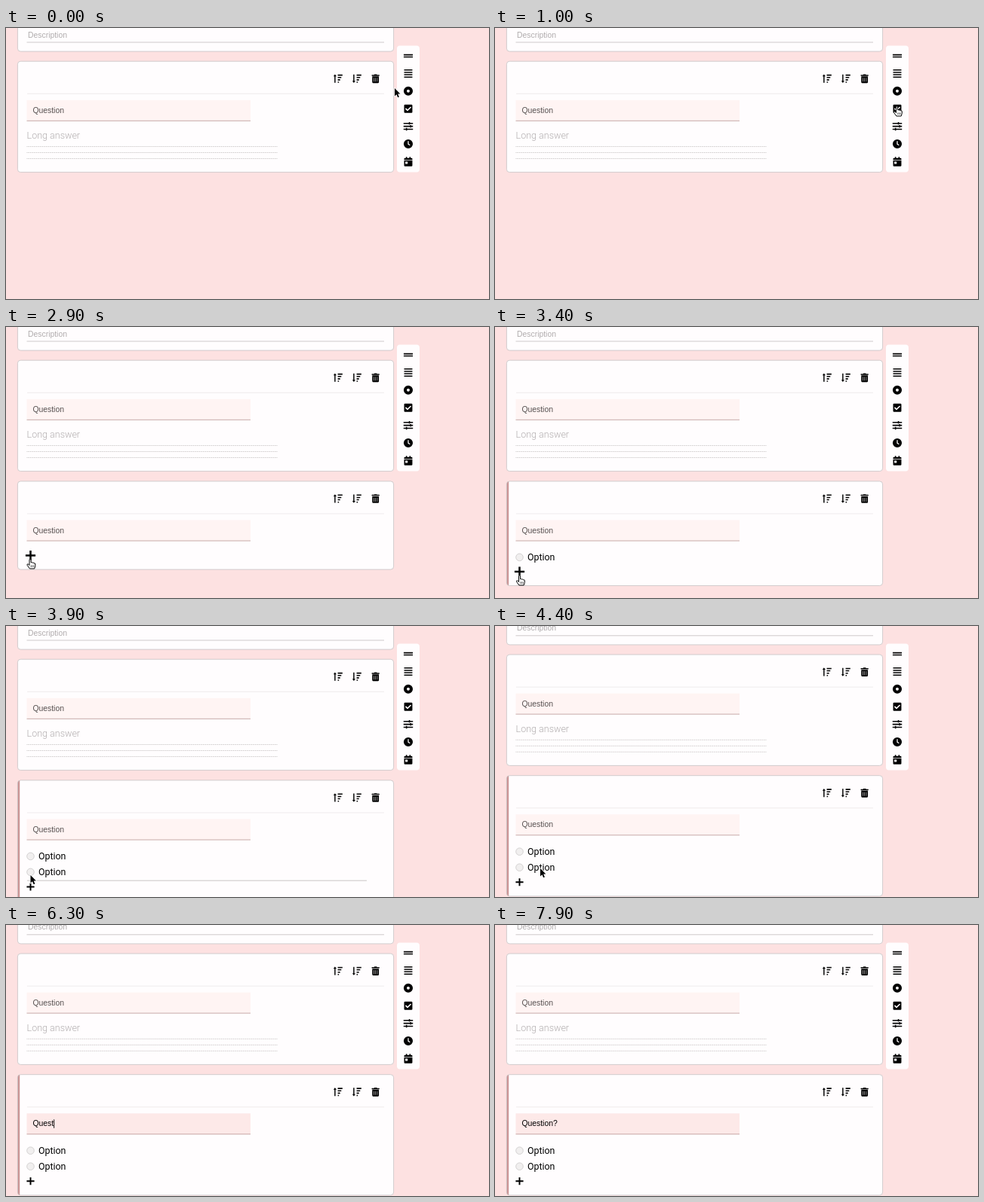
Animation of 640x360 px, one loop 8 s. Source, as an HTML page with a canvas:

```html
<!DOCTYPE html>
<html lang="en">
<head>
<meta charset="utf-8">
<title>Form builder</title>
<style>
  html, body { margin: 0; width: 100%; height: 100%; overflow: hidden; background: #fde1e1; }
  canvas { display: block; width: 640px; height: 360px; }
</style>
</head>
<body>
<canvas id="stage"></canvas>
<script>
const LOOP = 8000, STEP = 100;
const canvas = document.getElementById('stage');
const ctx = canvas.getContext('2d');
const dpr = window.devicePixelRatio || 1;
canvas.width = 640 * dpr;
canvas.height = 360 * dpr;

const INPUT_FONT = '10.4px "Liberation Sans", Arial, sans-serif';
const HINT_FONT = '300 12.5px Roboto, sans-serif';
const OPTION_FONT = '400 12.4px Roboto, sans-serif';
const PAPER = '#fffdfe', BACKDROP = '#fde1e1', FIELD = '#fff4f3';

// Icons live in a box 512 units high.
const rect = (x, y, w, h) => `M${x} ${y}h${w}v${h}h${-w}z`;
const disc = (x, y, r) => `M${x - r} ${y}a${r} ${r} 0 1 0 ${2 * r} 0a${r} ${r} 0 1 0 ${-2 * r} 0z`;
const slider = (y, x) =>
  `M0 ${y}h${x}v-36h64v36h${448 - x}v64H${x + 64}v36h-64v-36H0z`;
const sortBars = [0, 1, 2, 3].map(i => rect(240, 32 + i * 128, 256 - i * 64, 64)).join('');
const icon = (width, path) => ({ width, path: new Path2D(path) });

const ICONS = {
  up: icon(512, sortBars + 'M88 20L4 130h54v350h60V130h54z'),
  down: icon(512, sortBars + 'M88 492L4 382h54V32h60v350h54z'),
  trash: icon(448,
    'M32 128h384v336a48 48 0 0 1-48 48H80a48 48 0 0 1-48-48z' +
    'M432 32H312l-9-19A24 24 0 0 0 281 0H167a24 24 0 0 0-22 13l-9 19H16A16 16 0 0 0 0 48v32' +
    'a16 16 0 0 0 16 16h416a16 16 0 0 0 16-16V48a16 16 0 0 0-16-16z' +
    [116, 212, 308].map(x => rect(x, 208, 24, 224)).join('')),
  plus: icon(448, 'M184 48h80v168h168v80H264v168h-80V296H16v-80h168z'),
  grip: icon(512, rect(8, 168, 496, 64) + rect(8, 288, 496, 64)),
  lines: icon(448, [36, 164, 292, 420].map(y => rect(0, y, 448, 64)).join('')),
  radio: icon(512, disc(256, 256, 248) + disc(256, 256, 80)),
  check: icon(448,
    'M48 32h352a48 48 0 0 1 48 48v352a48 48 0 0 1-48 48H48a48 48 0 0 1-48-48V80a48 48 0 0 1 48-48z' +
    'M184 396L56 268l46-46 82 82 162-162 46 46z'),
  sliders: icon(512, slider(64, 288) + slider(224, 352) + slider(384, 128)),
  clock: icon(512, disc(256, 256, 248) + 'M230 104h52v146l82 60-30 41-104-77z'),
  calendar: icon(448,
    'M0 160v-48a48 48 0 0 1 48-48h48V0h64v64h128V0h64v64h48a48 48 0 0 1 48 48v48z' +
    'M0 192h448v272a48 48 0 0 1-48 48H48a48 48 0 0 1-48-48z' + rect(64, 256, 128, 128))
};

const TOOLS = ['grip', 'lines', 'radio', 'check', 'sliders', 'clock', 'calendar'];

const clamp = v => Math.max(0, Math.min(1, v));
const ramp = (t, start, length) => clamp((t - start) / length);
const hover = (t, from, to) => ramp(t, from, 150) * (1 - ramp(t, to, 250));

function drawIcon(name, x, y, scale = 1) {
  const { width, path } = ICONS[name], s = 12.48 / 512 * scale;
  ctx.save();
  ctx.translate(x, y);
  ctx.scale(s, s);
  ctx.translate(-width / 2, -256);
  ctx.fillStyle = '#000';
  ctx.fill(path, 'evenodd');
  ctx.restore();
}

function text(string, x, y, font, color) {
  ctx.font = font;
  ctx.fillStyle = color;
  ctx.fillText(string, x, y);
}

function rule(x1, x2, y, color, dash = []) {
  ctx.beginPath();
  ctx.setLineDash(dash);
  ctx.moveTo(x1, y);
  ctx.lineTo(x2, y);
  ctx.strokeStyle = color;
  ctx.lineWidth = 0.8;
  ctx.stroke();
  ctx.setLineDash([]);
}

function panel(y, height, active) {
  ctx.beginPath();
  ctx.roundRect(15.4, y + 0.4, 498.2, height - 0.8, 4);
  ctx.fillStyle = PAPER;
  ctx.fill();
  if (active) {
    ctx.save();
    ctx.clip();
    ctx.fillStyle = '#cc9596';
    ctx.fillRect(15, y, 3.2, height);
    ctx.restore();
  }
  ctx.strokeStyle = '#c6c3c4';
  ctx.lineWidth = 0.8;
  ctx.stroke();
}

function questionCard(y, height, { active = false, fill = FIELD, value = '' } = {}) {
  panel(y, height, active);
  drawIcon('up', 440, y + 23.5);
  drawIcon('down', 465, y + 23.5);
  drawIcon('trash', 489.7, y + 23.5, 0.94);
  rule(28, 501, y + 43.5, '#ebe6e7');
  ctx.fillStyle = fill;
  ctx.fillRect(27.5, y + 52, 296.5, 28);
  rule(27.5, 324, y + 79.5, '#b99a99');
  text(value || 'Question', 35.4, y + 69, INPUT_FONT, value ? '#000' : '#585252');
}

function option(y, underlined) {
  ctx.beginPath();
  ctx.arc(32.5, y, 4.8, 0, 7);
  ctx.fillStyle = '#f1efef';
  ctx.fill();
  ctx.strokeStyle = '#cbc8c8';
  ctx.lineWidth = 0.8;
  ctx.stroke();
  text('Option', 43, y + 4.3, OPTION_FONT, '#000');
  if (underlined) rule(28, 478, y + 11.3, '#bcb8b8');
}

// time, x, y, shape
const POINTER = [
  [0, 515, 80, 'arrow'], [100, 514.6, 79.5, 'arrow'], [200, 514.4, 79.2, 'arrow'],
  [500, 514.4, 79.2, 'arrow'], [800, 526, 96, 'hand'], [1000, 532.5, 104, 'hand'],
  [1200, 532.5, 105, 'hand'], [1300, 532.5, 105, 'hand'], [1700, 532, 82, 'hand'],
  [1900, 532, 82, 'hand'], [2000, 490, 108, 'arrow'], [2100, 395.5, 163.5, 'arrow'],
  [2400, 180, 248, 'arrow'], [2700, 45, 303, 'arrow'], [2800, 32, 308, 'hand'],
  [3100, 32, 308, 'hand'], [3300, 32.5, 326, 'hand'], [3400, 32.5, 330, 'hand'],
  [3500, 32.5, 331, 'arrow'], [3900, 32.5, 331, 'arrow'], [4200, 60, 322, 'arrow'],
  [4500, 60, 322, 'arrow'], [4700, 105, 285, 'arrow'], [4800, 122, 274, 'beam'],
  [4900, 128, 270, 'beam'], [5900, 128, 270, 'none'], [LOOP, 128, 270, 'none']
];

const ARROW = new Path2D('M0 0V10.4L2.4 8.2 4.2 12.2 5.9 11.5 4.2 7.5H7.4Z');
const HAND = new Path2D('M-1 1Q0-.8 1 1L1.2 5Q2.4 4 3.1 5.3 4.4 4.6 5 5.8 6.6 5.3 6.8 7' +
  'V9.5L5.7 13H-.6L-3.8 8.6Q-4.6 6.6-2.8 6.9L-1 8.5Z');
const HAND_CREASES = new Path2D('M1.2 8.4V11M3 8.4V11M4.8 8.4V11');
const BEAM = new Path2D('M-2.5-5.5Q0-5.5 0-4V4.5Q0 6-2.5 6M2.5-5.5Q0-5.5 0-4V4.5Q0 6 2.5 6M-1.3 2H1.3');

function drawPointer(t) {
  const next = POINTER.findIndex(key => key[0] > t);
  const [t0, x0, y0, shape] = POINTER[next - 1], [t1, x1, y1] = POINTER[next];
  if (shape === 'none') return;
  const p = (t - t0) / (t1 - t0);
  ctx.save();
  ctx.translate(x0 + (x1 - x0) * p, y0 + (y1 - y0) * p);
  ctx.lineJoin = 'round';
  if (shape === 'arrow') {
    ctx.strokeStyle = '#fff';
    ctx.lineWidth = 1.6;
    ctx.stroke(ARROW);
    ctx.fillStyle = '#000';
    ctx.fill(ARROW);
  } else if (shape === 'hand') {
    ctx.fillStyle = '#fff';
    ctx.fill(HAND);
    ctx.strokeStyle = '#000';
    ctx.lineWidth = 1;
    ctx.stroke(HAND);
    ctx.lineWidth = 0.6;
    ctx.stroke(HAND_CREASES);
  } else {
    ctx.strokeStyle = '#222';
    ctx.lineWidth = 1;
    ctx.stroke(BEAM);
  }
  ctx.restore();
}

function typedValue(t) {
  if (t < 5900) return '';
  const letters = Math.min(8, Math.floor((t - 5900) / 600 * 7) + 1);
  return 'Question'.slice(0, letters) + (t >= 7400 ? '?' : '');
}

function caretShown(t) {
  return [[5100, 5500], [5900, 7000], [7400, 7800]].some(([on, off]) => t >= on && t < off);
}

function newCard(t, scroll) {
  if (t < 1900) return;
  const entry = ramp(t, 1850, 500);
  const y = 204.5 - 12 * (1 - entry) ** 2 - scroll;
  const first = ramp(t, 3000, 200), second = ramp(t, 3400, 200);
  const grown = 21.5 * (first + second);
  const value = typedValue(t);
  const fill = t >= 5100 ? '#fde9e8' : t >= 4800 ? '#fde1e1' : FIELD;

  ctx.save();
  ctx.globalAlpha = clamp(entry * 2);
  questionCard(y, 118 + grown, { active: t >= 3000, fill, value });
  if (caretShown(t)) {
    ctx.font = INPUT_FONT;
    ctx.fillStyle = '#000';
    ctx.fillRect(35.5 + ctx.measureText(value).width, y + 60, 0.9, 11.5);
  }
  if (first) {
    ctx.globalAlpha = first;
    option(y + 101.4, false);
  }
  if (second) {
    ctx.globalAlpha = second;
    option(y + 122.4, t >= 3600 && t < 4600 && scroll === 0);
  }
  ctx.globalAlpha = clamp(entry * 2);
  const zoom = 1 + 0.3 * Math.max(hover(t, 2750, 3000), hover(t, 3200, 3400));
  drawIcon('plus', 32.5, y + 99 + grown, zoom);
  ctx.restore();
}

function toolbar(t) {
  ctx.beginPath();
  ctx.roundRect(518, 23.5, 30, 168, 4);
  ctx.fillStyle = PAPER;
  ctx.fill();
  const zoom = {
    check: 1 + 0.2 * hover(t, 1000, 1500),
    radio: 1 + 0.2 * hover(t, 1550, 2060)
  };
  TOOLS.forEach((name, i) => drawIcon(name, 533, 37 + i * 23.4, zoom[name]));
}

function draw(t) {
  ctx.setTransform(dpr, 0, 0, dpr, 0, 0);
  ctx.fillStyle = BACKDROP;
  ctx.fillRect(0, 0, 640, 360);
  const scroll = 6.2 * ramp(t, 4200, 200);

  panel(-40 - scroll, 71.5, false);
  text('Description', 29, 12.6 - scroll, INPUT_FONT, '#b0acad');
  rule(27.5, 501, 19 - scroll, '#c0bcbd');

  const y = 43.8 - scroll;
  questionCard(y, 148.2);
  text('Long answer', 27.6, y + 103.4, HINT_FONT, '#b2aeaf');
  [113.7, 121.7, 129.7].forEach(dy => rule(27.5, 360, y + dy, '#b5b1b2', [0.8, 0.8]));

  newCard(t, scroll);
  toolbar(t);
  drawPointer(t);
}

function frame() {
  const t = performance.now() % LOOP;
  draw(Math.floor(t / STEP) * STEP);
  requestAnimationFrame(frame);
}
frame();
</script>
</body>
</html>
```
